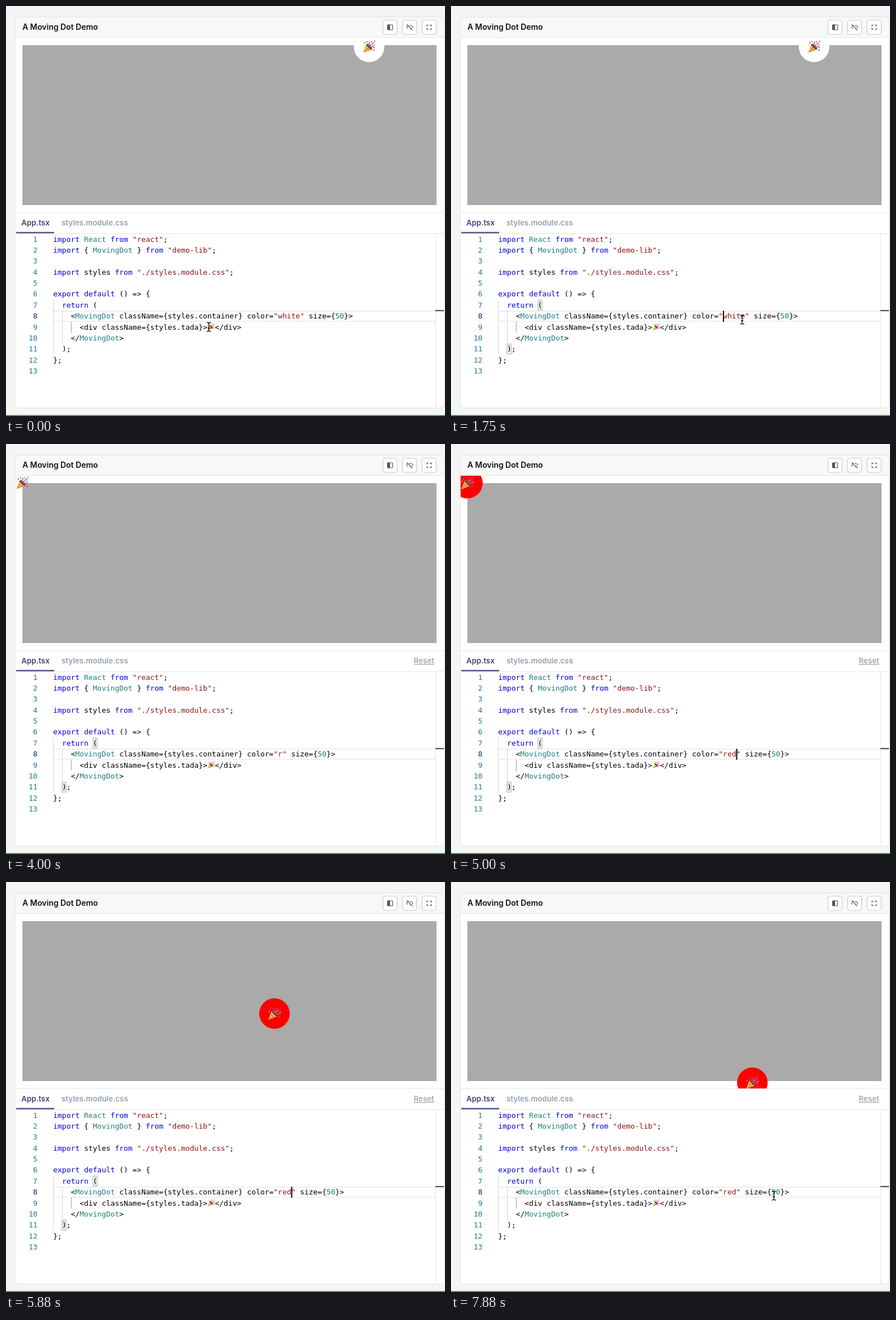
Recreate the animation shown at these times as an HTML page. Size 775 by 723 pixels, loop 8 s.

```html
<!DOCTYPE html>
<html lang="en">
<head>
<meta charset="utf-8">
<title>A Moving Dot Demo</title>
<style>
html, body { margin: 0; width: 100%; height: 100%; overflow: hidden; background: #f4f5f5; }
svg { display: block; }
text { white-space: pre; }

.ui { font: 600 13.3px Inter, sans-serif; fill: #94a0b2; }
.code { font: 12.93px "DejaVu Sans Mono", monospace; fill: #000; }
.nums { fill: #237893; text-anchor: end; }
.k { fill: #0000d8; }
.t { fill: #1f7f7c; }
.s { fill: #8f1414; }
.n { fill: #12855f; }

.icon { fill: none; stroke: #555; stroke-width: 1.2; }
.anim { animation: var(--a) 8s step-end -10ms infinite; }
.off { opacity: 0; }

/* typing */
@keyframes white { 43.75%, to { opacity: 0; } }
@keyframes r { 43.75% { opacity: 1; } 51.5625%, to { opacity: 0; } }
@keyframes re { 51.5625% { opacity: 1; } 60.9375%, to { opacity: 0; } }
@keyframes red { 60.9375%, to { opacity: 1; } }

/* editor state */
@keyframes reset { 43.75%, to { opacity: 1; } }
@keyframes select { 28.125% { opacity: 1; } 43.75%, to { opacity: 0; } }
@keyframes match {
  9.375%, 43.75% { opacity: 1; }
  28.125%, 78.125%, to { opacity: 0; }
}
@keyframes caret {
  0% { transform: translateX(480px); }
  9.375%, 21.875%, 40.625%, 73.4375% { opacity: 1; }
  28.125% { opacity: 1; transform: translateX(519px); }
  43.75% { opacity: 1; transform: translateX(487.9px); }
  51.5625% { opacity: 1; transform: translateX(495.7px); }
  60.9375% { opacity: 1; transform: translateX(503.4px); }
  15.625%, 34.375%, 50%, 57.8125%, 67.1875%, 78.125%, to { opacity: 0; }
}

/* pointer */
@keyframes show { 28.125% { opacity: 0; } 90.625%, to { opacity: 1; } }
@keyframes point {
  0% { transform: translate(358px, 566px); animation-timing-function: steps(6); }
  9.375% { transform: translate(481px, 549px); }
  12.5% { transform: translate(481px, 549px); animation-timing-function: steps(6); }
  21.875% { transform: translate(514px, 553px); }
  90.625% { transform: translate(580px, 528px); }
  92.1875% { transform: translate(580px, 528px); animation-timing-function: steps(4); }
  98.4375%, to { transform: translate(570px, 553px); }
}

/* dot follows the pointer inside the preview */
@keyframes follow {
  0% { transform: translate(641px, 72px); }
  43.75% { transform: translate(29px, 69px); }
  67.1875% { transform: translate(452px, 345px); }
  68.75% { transform: translate(407px, 291px); }
  70.3125% { transform: translate(457px, 229px); }
  71.875% { transform: translate(474px, 232px); }
  85.9375% { transform: translate(484px, 252px); }
  87.5% { transform: translate(510px, 308px); }
  89.0625%, to { transform: translate(532px, 354px); }
}
@keyframes paint {
  0% { fill: #fff; }
  43.75% { fill: transparent; }
  60.9375%, to { fill: #f00; }
}
</style>
</head>
<body>
<svg width="775" height="723" viewBox="0 0 775 723">
  <defs>
    <clipPath id="card"><rect x="16" y="19" width="758" height="690" rx="7"/></clipPath>
    <clipPath id="preview"><rect x="17" y="56" width="756" height="308"/></clipPath>
    <linearGradient id="gold" x1="0" y1="0" x2="1" y2="1">
      <stop stop-color="#ffe08a"/><stop offset="1" stop-color="#e39a2c"/>
    </linearGradient>
    <symbol id="tada" viewBox="-11 -11 22 22">
      <path d="M-10.5 10.5L-4.5-5Q2-2 5 4.500Z" fill="url(#gold)"/>
      <path d="M-8.500 5.300L-5 8.200M-6.800.800L-.500 6.500M-5.300-3L3.500 4.800" stroke="#b5651d" stroke-width="1.100"/>
      <ellipse rx="6.600" ry="2.500" transform="translate(.3 -.3) rotate(45)" fill="#7d4a30"/>
      <path d="M0-1Q-1-5 1.500-9M1-1Q4-6 9-6.500M2 0Q6-1 10 2" fill="none" stroke="#b04fc0" stroke-width="1.300"/>
      <g fill="#e0433c"><circle cx="-3" cy="-8.500" r="1.100"/><circle cx="4.500" cy="-8.500" r="1.100"/><circle cx="8" cy="5.500" r="1.200"/></g>
      <g fill="#3f74d8"><circle cx="-7" cy="-7" r="1.200"/><circle cx="9.500" cy="-9.500" r="1.100"/><circle cx="7" cy="-2.500" r="1.100"/></g>
      <g fill="#f2b632"><circle cx="-9" cy="-3" r="1"/><circle cx="4" cy="-4" r="1"/><circle cx="9.500" cy="-2" r="1"/></g>
    </symbol>
    <rect id="button" x="-12.500" y="-12.500" width="25" height="25" rx="4" fill="#fff" stroke="#cbcbcb"/>
  </defs>

  <rect width="775" height="723" fill="#f4f5f5"/>
  <rect y="721.500" width="775" height="1.500" fill="#3b8146"/>

  <g clip-path="url(#card)">
    <rect x="16" y="19" width="758" height="690" fill="#fff"/>
    <rect x="16" y="19" width="758" height="36" fill="#f8f8f9"/>
    <path d="M16 55.500H774M16 364.500H774M16 401.500H774M758.500 402V709" stroke="#e5e6e8"/>
  </g>
  <rect x="16" y="19.500" width="757.500" height="689.500" rx="7" fill="none" stroke="#e2e4e6"/>

  <text class="ui" x="29" y="42" style="font-size:13.9px;fill:#111">A Moving Dot Demo</text>
  <g class="icon">
    <g transform="translate(678 37.500)">
      <use href="#button"/><rect x="-4.500" y="-4.500" width="9" height="9" rx="1"/>
      <path d="M-4.500-4.500H0V4.500H-4.500Z" fill="#555" stroke="none"/>
    </g>
    <g transform="translate(712.500 37.500)">
      <use href="#button"/>
      <path d="M-5-5L5 5M-1.500-3H-2.500A2.700 2.700 0 0 0-3.500 2M1 3H2.500M0-3H2.500A2.700 2.700 0 0 1 4.500 1.500"/>
    </g>
    <g transform="translate(747 37.500)">
      <use href="#button"/>
      <path d="M-3.800-1.300V-3.800H-1.300M1.300-3.800H3.800V-1.300M3.800 1.300V3.800H1.300M-1.300 3.800H-3.800V1.300"/>
    </g>
  </g>

  <rect x="29" y="69" width="731" height="282" fill="#aaa"/>
  <g clip-path="url(#preview)">
    <g class="anim" style="--a:follow">
      <circle class="anim" style="--a:paint" r="27"/>
      <use href="#tada" x="-11.500" y="-11.500" width="23" height="23"/>
    </g>
  </g>

  <g class="ui">
    <text x="27" y="387" style="fill:#43407a">App.tsx</text>
    <text x="98" y="387">styles.module.css</text>
    <text class="anim off" x="756" y="387" text-anchor="end" text-decoration="underline" style="--a:reset;fill:#a9a9a9">Reset</text>
  </g>
  <rect x="18" y="398.500" width="67" height="2.200" fill="#43407a"/>

  <path d="M83 538.200H758M83 556H758" stroke="#ececec" stroke-width="1.700"/>
  <path d="M83.500 518V614M99.500 537.500V595" stroke="#d6d6d6"/>
  <path d="M115.200 556.500V576" stroke="#999"/>
  <rect x="758" y="536" width="15" height="2.200" fill="#505050"/>
  <g class="anim off" style="--a:match" fill="#e7ebe7" stroke="#b9b9b9">
    <rect x="153.500" y="518.500" width="7.500" height="18"/>
    <rect x="98.800" y="596" width="7.500" height="18"/>
  </g>
  <rect class="anim off" style="--a:select" x="480" y="537.500" width="39.500" height="19" rx="3" fill="#add6ff"/>

  <g class="code nums">
    <text x="55.500" y="415.600">1</text>
    <text x="55.500" y="435">2</text>
    <text x="55.500" y="454.300">3</text>
    <text x="55.500" y="473.700">4</text>
    <text x="55.500" y="493.100">5</text>
    <text x="55.500" y="512.400">6</text>
    <text x="55.500" y="531.800">7</text>
    <text x="55.500" y="551.200" fill="#0b216f">8</text>
    <text x="55.500" y="570.600">9</text>
    <text x="55.500" y="589.900">10</text>
    <text x="55.500" y="609.300">11</text>
    <text x="55.500" y="628.700">12</text>
    <text x="55.500" y="648">13</text>
  </g>
  <g class="code">
    <text x="83.300" y="415.600"><tspan class="k">import</tspan> <tspan class="t">React</tspan> <tspan class="k">from</tspan> <tspan class="s">"react"</tspan>;</text>
    <text x="83.300" y="435"><tspan class="k">import</tspan> { <tspan class="t">MovingDot</tspan> } <tspan class="k">from</tspan> <tspan class="s">"demo-lib"</tspan>;</text>
    <text x="83.300" y="473.700"><tspan class="k">import</tspan> styles <tspan class="k">from</tspan> <tspan class="s">"./styles.module.css"</tspan>;</text>
    <text x="83.300" y="512.400"><tspan class="k">export</tspan> <tspan class="k">default</tspan> () =&gt; {</text>
    <text x="98.900" y="531.800"><tspan class="k">return</tspan> (</text>
    <text x="114.400" y="551.200">&lt;<tspan class="t">MovingDot</tspan> className={styles.container} color=<tspan class="s">"</tspan></text>
    <g transform="translate(480.100 551.200)">
      <text class="anim" style="--a:white"><tspan class="s">white"</tspan> size={<tspan class="n">50</tspan>}&gt;</text>
      <text class="anim off" style="--a:r"><tspan class="s">r"</tspan> size={<tspan class="n">50</tspan>}&gt;</text>
      <text class="anim off" style="--a:re"><tspan class="s">re"</tspan> size={<tspan class="n">50</tspan>}&gt;</text>
      <text class="anim off" style="--a:red"><tspan class="s">red"</tspan> size={<tspan class="n">50</tspan>}&gt;</text>
    </g>
    <text x="130" y="570.600">&lt;div className={styles.tada}&gt;</text>
    <use href="#tada" x="355.800" y="559.500" width="13" height="13"/>
    <text x="368.800" y="570.600">&lt;/div&gt;</text>
    <text x="114.400" y="589.900">&lt;/<tspan class="t">MovingDot</tspan>&gt;</text>
    <text x="98.900" y="609.300">);</text>
    <text x="83.300" y="628.700">};</text>
  </g>

  <rect class="anim off" style="--a:caret" y="537.500" width="2" height="19.200"/>
  <g class="anim" style="--a:show">
    <g class="anim" style="--a:point" fill="none">
      <path id="beam" d="M-3.500-8Q-.500-8 0-6Q.500-8 3.500-8M0-6V6M-3.500 8Q-.500 8 0 6Q.500 8 3.500 8M-2 2H2" stroke="#111" stroke-width="1.300"/>
    </g>
  </g>
</svg>
</body>
</html>
```
